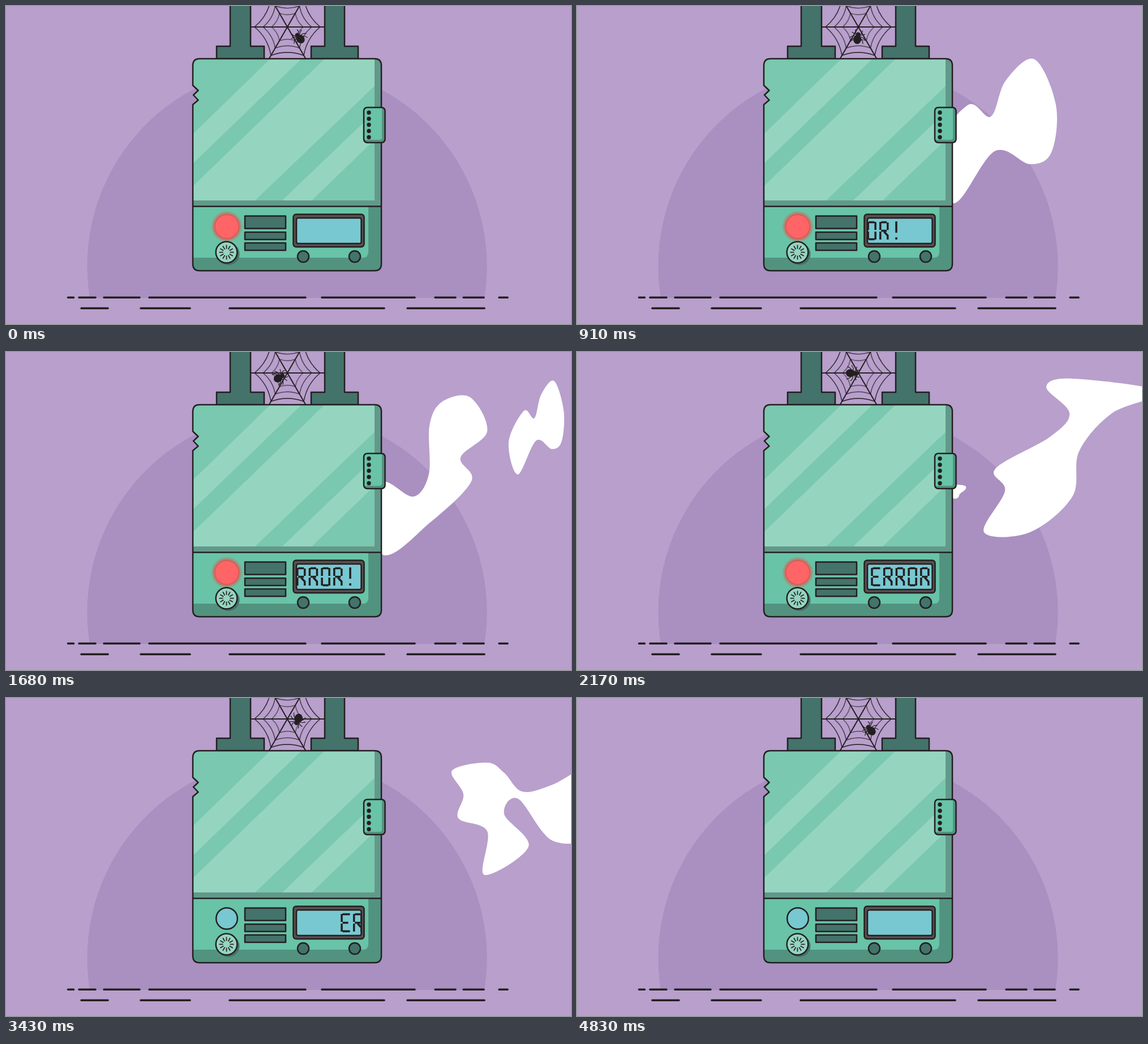
An HTML page that plays this animation: 998x561 px, repeating every 4.9 s.

```html
<!DOCTYPE html>
<html lang="en">
<head>
<meta charset="utf-8">
<title>Broken machine</title>
<style>
html, body { margin: 0; width: 100%; height: 100%; overflow: hidden; background: #b89fcc; }
svg { display: block; width: 100%; height: 100%; }
.line { stroke: #231f20; stroke-width: 2.5; stroke-linejoin: round; }
.dark { fill: #44736b; }
.light { fill: #95d5c0; }
.mint { fill: #68c3a7; }
.shade { fill: #52937f; }
.screen { fill: #78c8d1; }
.ink { fill: none; stroke: #231f20; }
</style>
</head>
<body>
<svg viewBox="0 0 998 561">
  <defs>
    <path id="case" d="M342 93H651Q663 93 663 105V455Q663 467 651 467H342Q330 467 330 455V174L339.500 166 331 157 339.500 149 330 140V105Q330 93 342 93Z"/>
    <clipPath id="body"><use href="#case"/></clipPath>
    <clipPath id="display"><rect x="513" y="374" width="114" height="45"/></clipPath>
    <radialGradient id="glow">
      <stop offset=".7" stop-color="#f4433f"/>
      <stop offset=".84" stop-color="#f4433f" stop-opacity=".45"/>
      <stop offset="1" stop-color="#f4433f" stop-opacity="0"/>
    </radialGradient>
  </defs>
  <path fill="#aa8fc1" d="M148 515A353 353 0 1 1 845 515Z"/>
  <path class="ink" stroke-width="3.600" stroke-linecap="round" d="M109.500 514.300h10M129 514.300h29M173 514.300h63M253 514.300h276M558 514.300h164M758 514.300h36M808 514.300h36M871 514.300h15M133 533.300h47M238 533.300h87M395 533.300h273M709 533.300h136"/>

  <g id="smoke" fill="#fff"></g>

  <g id="web" class="ink"></g>
  <g id="spider" fill="#231f20">
    <ellipse cy="3" rx="7" ry="8"/><circle cy="-6" r="3.800"/>
    <path class="ink" stroke-width="1.200" d="M-3-6Q-7-9-6-14M3-6Q7-9 6-14M-3-4Q-9-8-12-8M3-4Q9-8 12-8M-4-2Q-10-3-14 2M4-2Q10-3 14 2M-4 0Q-10 3-11 9M4 0Q10 3 11 9"/>
  </g>
  <path class="dark line" d="M396-5H432V71H456V93H372V71H396ZM563-5H598V71H622V93H539V71H563Z"/>

  <g clip-path="url(#body)">
    <path fill="#7ac8af" d="M330 93H663V353H330Z"/>
    <path class="light" d="M467 93H522L330 278V226ZM563 93H651V141L440 343H330V318ZM651 187V236L540 343H488Z"/>
    <path fill="#62998a" d="M651 93H663V353H330V343H651Z"/>
    <path class="shade" d="M330 353H663V467H330Z"/>
    <path class="mint" d="M330 353H640V434Q640 444 630 444H330Z"/>
  </g>
  <use href="#case" class="ink line"/>
  <path class="ink line" d="M330 353.500H663"/>

  <rect class="shade" x="632" y="179" width="37" height="62" rx="6"/>
  <path class="mint" d="M632 179H664V232Q664 236 660 236H632Z"/>
  <rect class="ink line" x="632" y="179" width="37.500" height="62" rx="6"/>
  <path class="ink" stroke-width="7.400" stroke-linecap="round" d="M641 188h0M641 199h0M641 209.500h0M641 220.500h0M641 231.500h0"/>

  <circle class="screen line" cx="390" cy="389" r="18.800"/>
  <g id="lamp">
    <circle cx="390" cy="389" r="28" fill="url(#glow)"/>
    <circle cx="390" cy="389" r="20.300" fill="#ff6567"/>
  </g>
  <circle class="dark" cx="393" cy="437.500" r="19.500"/>
  <circle class="light line" cx="389.500" cy="434.500" r="18.800"/>
  <g id="ticks" class="ink" stroke-width="1.700" transform="translate(389.500 434.500)"></g>
  <path class="dark line" d="M422 370.500h72v22h-72zM422 399h72v13h-72zM422 418h72v13h-72z"/>

  <rect class="line" x="507.500" y="367.500" width="125" height="57.500" rx="5" fill="#58504f"/>
  <rect class="screen line" x="513" y="374" width="114.500" height="45" rx="3"/>
  <g clip-path="url(#display)">
    <g id="message" class="ink" stroke-width="3.500" role="img" aria-label="ERROR!"></g>
  </g>
  <circle class="dark line" cx="525" cy="442" r="10"/>
  <circle class="dark line" cx="616" cy="442" r="10"/>
</svg>
<script>
const LOOP = 4900, STEP = 70;
const el = id => document.getElementById(id);

// Six spokes joined by sagging threads
const polar = (r, deg) => {
  const a = deg * Math.PI / 180;
  return `${497 + r * Math.cos(a)} ${37 + r * Math.sin(a)}`;
};
let threads = '';
for (let a = 0; a < 360; a += 60) {
  threads += `<path stroke-width="2" d="M497 37L${polar(65, a)}"/>`;
  for (let r = 58; r > 20; r -= 15)
    threads += `<path stroke-width="1.600" opacity="${.3 + r / 100}"
      d="M${polar(r, a)}Q${polar(r * .68, a + 30)} ${polar(r, a + 60)}"/>`;
}
el('web').innerHTML = threads;

for (let a = 0; a < 360; a += 30)
  el('ticks').innerHTML += `<path d="M0-6V-13" transform="rotate(${a})"/>`;

// Segment letters
const glyphs = {
  E: 'M1.500 1V15M1.500 18V32M3 1.600H16M3 16.500H13M3 31.400H16',
  R: 'M1.500 1V15M1.500 18V32M3 1.600H13M14.500 2V15M3 16.500H13M8 18L14.500 25V32',
  O: 'M1.500 1V15M1.500 18V32M3 1.600H13M14.500 1V15M14.500 18V32M3 31.400H13',
  '!': 'M8 0V20M8 28V32'
};
el('message').innerHTML = [...'ERROR!'].map((c, i) =>
  `<path d="${glyphs[c]}" transform="translate(${i * 21.7} 380)"/>`).join('');

// Key outlines of the smoke, as x, y pairs
const cloud = [808,94, 846,175, 838,258, 800,279, 738,256, 666,348, 630,260, 690,175, 731,195, 757,132];
const plume = [770,88, 820,80, 850,140, 803,186, 822,228, 750,300,
  664,357, 630,230, 672,229, 720,255, 747,215, 748,130];
const plumeBent = [829,62, 875,47, 1030,70, 945,108, 887,175, 875,255,
  800,318, 719,318, 756,245, 739,206, 835,150, 870,108];
const plumeSplit = [978,18, 1030,18, 1080,90, 1060,200, 984,232, 979,203,
  915,154, 863,166, 866,125, 872,96, 945,104, 987,62];
const wisp = [664,130, 716,187, 713,218, 738,225, 765,186, 849,194, 856,228, 800,275,
  783,310, 748,323, 712,303, 676,238, 630,225, 625,130, 640,118];
const wispTorn = [788,128, 850,114, 880,132, 912,165, 965,153, 1060,110, 1040,235, 966,252,
  905,178, 880,205, 923,262, 845,312, 850,235, 799,212, 808,170];

// Scales an outline and puts its first point at x, y; without a scale it shrinks away
const placed = (points, x, y, sx = 0, sy = sx) => points.map((v, i) =>
  i % 2 ? y + (v - points[1]) * sy : x + (v - points[0]) * sx);

// Each puff leaves the machine, changes shape and drifts off
const puffs = [
  [[0, placed(cloud, 650, 260)], [910, cloud],
    [1680, placed(cloud, 968, 51, .45, .65)], [2400, placed(cloud, 1130, 40, .45, .65)]],
  [[910, placed(plume, 640, 290)], [1680, plume], [2170, plumeBent],
    [2730, plumeSplit], [3500, placed(plumeSplit, 1130, 10, 1)]],
  [[2050, placed(wisp, 650, 245)], [2730, wisp], [3430, wispTorn], [4620, placed(wispTorn, 965, 80)]]
];
el('smoke').innerHTML = '<path/>'.repeat(puffs.length);

function morph(keys, t) {
  const i = keys.findIndex(([time]) => time > t);
  if (i < 1) return [];
  const [[from, a], [to, b]] = [keys[i - 1], keys[i]];
  return a.map((v, k) => v + (b[k] - v) * (t - from) / (to - from));
}

// Closed smooth curve through the points
function outline(flat) {
  const n = flat.length / 2;
  if (!n) return '';
  const at = i => [flat[(i + n) % n * 2], flat[(i + n) % n * 2 + 1]];
  let d = 'M' + at(0);
  for (let i = 0; i < n; i++) {
    const [p, q, r, s] = [at(i - 1), at(i), at(i + 1), at(i + 2)];
    d += 'C' + [q.map((v, k) => v + (r[k] - p[k]) / 6), r.map((v, k) => v - (s[k] - q[k]) / 6), r];
  }
  return d + 'Z';
}

// One round on a tilted ellipse, then a rest
function crawl(t) {
  const u = Math.min(1, t / 4600), a = (40 + 360 * u) * Math.PI / 180;
  const x = 503 + 20 * Math.cos(a), y = 46 + 12 * Math.sin(a) + 3 * Math.cos(a);
  const heading = 360 * (u - .1 * Math.sin(Math.PI * u)) - 40;
  return `translate(${x} ${y}) rotate(${heading})`;
}

function draw(now) {
  let t = Math.floor(now % LOOP / STEP) * STEP;
  if (t < 2 * STEP) t = 0;
  puffs.forEach((keys, i) => el('smoke').children[i].setAttribute('d', outline(morph(keys, t))));
  el('spider').setAttribute('transform', crawl(t));
  el('message').setAttribute('transform', `translate(${395.5 + t * 2 / 35})`);
  el('lamp').setAttribute('visibility', t % 700 < 350 ? 'visible' : 'hidden');
}

const start = performance.now();
(function frame() {
  draw(performance.now() - start);
  requestAnimationFrame(frame);
})();
</script>
</body>
</html>
```
